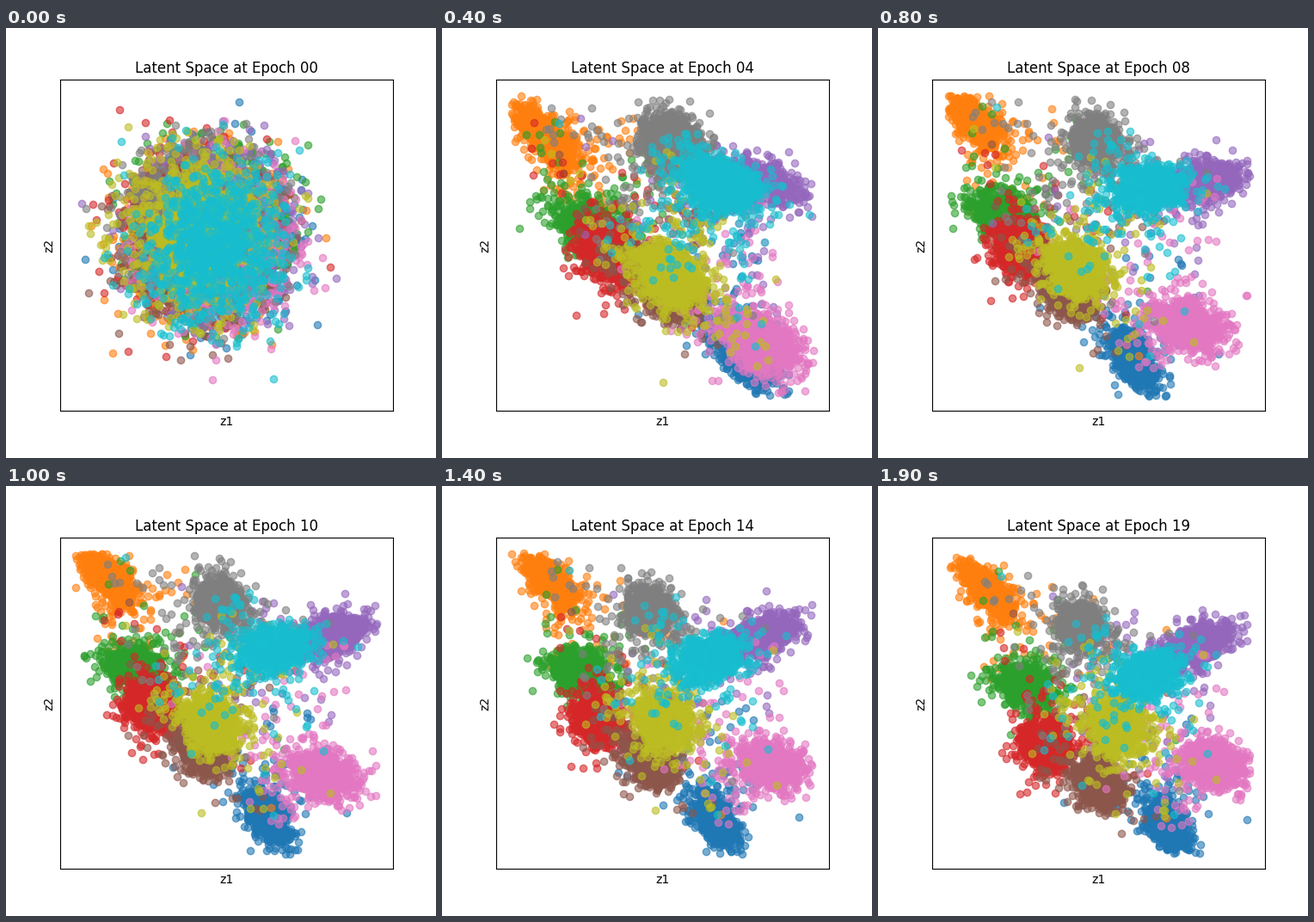
A matplotlib script for the animation above (2 s loop, 500 by 500 pixels).

```python
import numpy as np
import matplotlib.pyplot as plt
from matplotlib.animation import FuncAnimation

EPOCHS = 20
CLASSES = 10
BODY = 880
LEAK = 110

# Cluster centres in stage pixels (y down) at a few key epochs, one row per class
KEYS = [2, 6, 8, 12, 18]
PATHS = np.array([
    [(380, 375), (322, 386), (297, 385), (308, 384), (336, 394)],
    [(122, 135), (112, 112), (111, 107), (126, 107), (127, 120)],
    [(182, 244), (166, 224), (145, 216), (156, 208), (172, 232)],
    [(202, 267), (185, 257), (165, 257), (173, 257), (194, 302)],
    [(341, 180), (387, 180), (381, 178), (376, 167), (372, 183)],
    [(281, 310), (237, 300), (222, 308), (234, 309), (257, 348)],
    [(375, 370), (371, 361), (361, 346), (377, 325), (391, 323)],
    [(254, 126), (276, 133), (253, 131), (242, 136), (236, 162)],
    [(280, 291), (250, 283), (230, 279), (248, 270), (278, 280)],
    [(318, 180), (330, 185), (313, 186), (308, 192), (314, 220)],
])

# Settled spread along and across each cluster, and its tilt in degrees
LONG = [16, 16, 15, 13, 18, 14, 18, 13, 17, 16]
SHORT = [8, 7, 11, 12, 9, 11, 12, 12, 13, 11]
TILT = [59, 42, 20, 60, -20, 45, 12, 60, 30, -12]

# Direction in which each class leans inside the untrained cloud
LEAN = np.radians([35, 160, -60, 185, -15, 125, 50, -150, -160, 70])


def center(k, epoch):
    return np.array([np.interp(epoch, KEYS, xy) for xy in PATHS[k].T])


def heavy_tailed(rng, n):
    return rng.normal(size=(n, 2)) / np.sqrt(rng.chisquare(8, (n, 1)) / 8)


def leak_targets(rng, k, n):
    """Choose the classes that stray points drift to; near ones are likelier."""
    gap = np.hypot(*(PATHS[:, 3] - PATHS[k, 3]).T)
    odds = np.exp(-gap / 65) * (gap > 0)
    return rng.choice(CLASSES, n, p=odds / odds.sum())


base = np.random.default_rng(7)
body = [heavy_tailed(base, BODY) for _ in range(CLASSES)]
goal = [leak_targets(base, k, 3 * LEAK) for k in range(CLASSES)]
reach = base.random((CLASSES, 3 * LEAK, 1)) ** 1.2
scatter = base.normal(0, 13, (CLASSES, 3 * LEAK, 2))


def untrained(k, rng):
    mid = [236 + 15 * np.cos(LEAN[k]), 240 + 15 * np.sin(LEAN[k])]
    return mid + rng.normal(size=(1000, 2)) * [40, 43]


def trained(k, epoch, rng):
    young = np.exp(-max(epoch - 2, 0) / 3)
    mid = center(k, epoch)
    spread = np.array([LONG[k] * (1 + 0.7 * young), SHORT[k] * (1 + 0.35 * young)])
    a = np.radians(TILT[k] + (45 - TILT[k]) * young)
    turn = np.array([[np.cos(a), np.sin(a)], [-np.sin(a), np.cos(a)]])

    z = 0.9 * body[k] + 0.3 * rng.normal(size=(BODY, 2))
    core = mid + (z * spread) @ turn

    n = int(LEAK * (1 + 1.6 * young))
    ends = np.array([center(j, epoch) for j in goal[k][:n]])
    strays = mid + reach[k, :n] * (ends - mid) + scatter[k, :n]
    return np.vstack([core, strays + rng.normal(0, 4, (n, 2))])


def cluster(k, epoch):
    rng = np.random.default_rng(1000 * epoch + k)
    pts = trained(k, epoch, rng) if epoch else untrained(k, rng)
    inside = (pts > [81, 78]) & (pts < [432, 428])
    return pts[inside.all(axis=1)]


fig, ax = plt.subplots(figsize=(5, 5), dpi=100)
ax.set(xlim=(62.5, 450), ylim=(445, 60), xlabel="z1", ylabel="z2",
       xticks=[], yticks=[])
title = ax.set_title("Latent Space at Epoch 00")
dots = [ax.scatter([], [], color=f"C{k}", alpha=0.6) for k in range(CLASSES)]


def update(epoch):
    title.set_text(f"Latent Space at Epoch {epoch:02d}")
    for k, dot in enumerate(dots):
        dot.set_offsets(cluster(k, epoch))
    return [title, *dots]


anim = FuncAnimation(fig, update, frames=EPOCHS, interval=100,
                     repeat=True, repeat_delay=0, blit=False)
plt.show()
```
